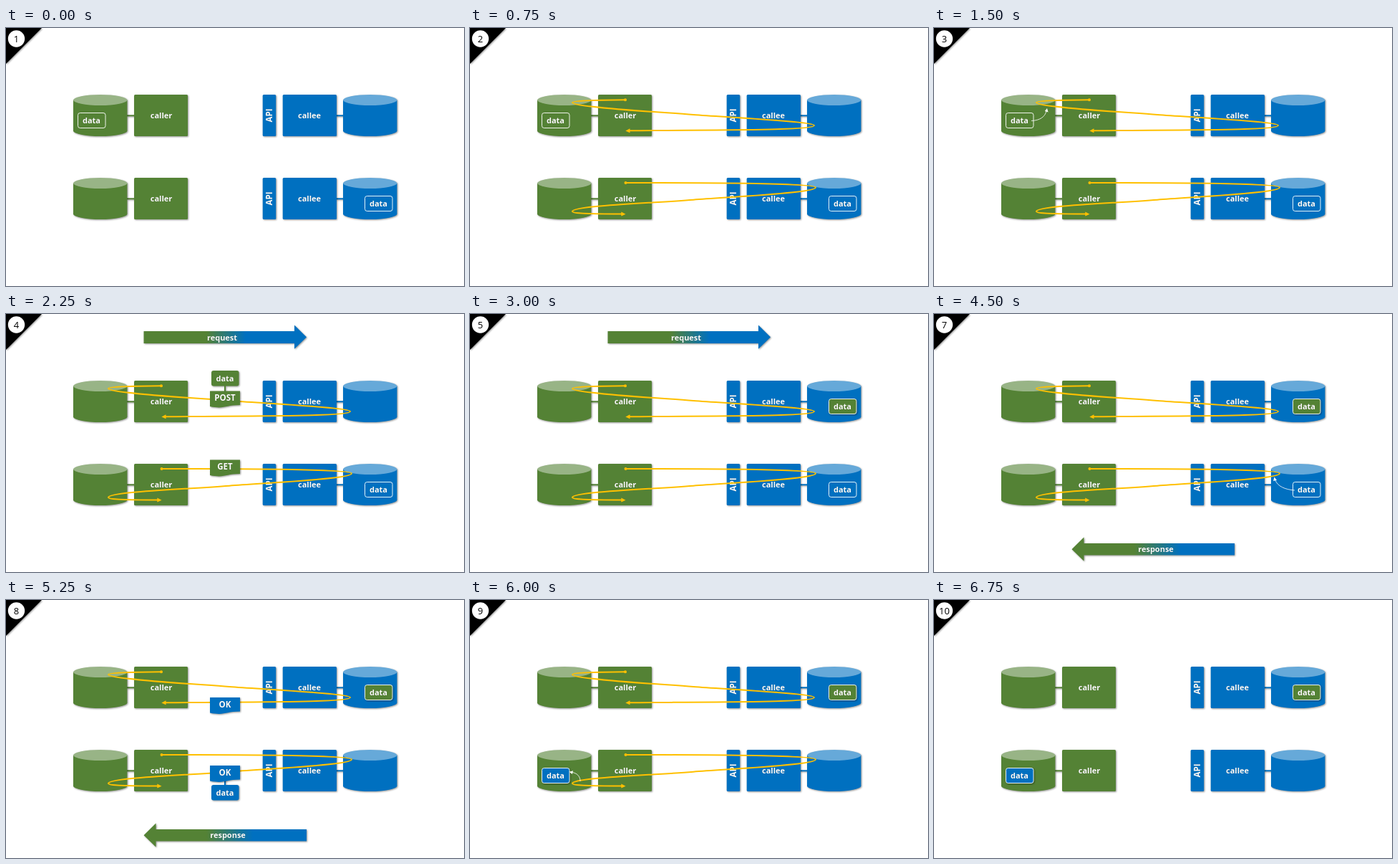
These frames come from a looping animation (640 by 360 pixels, 7500 ms). An HTML page:

```html
<!DOCTYPE html>
<html lang="en">
<head>
<meta charset="utf-8">
<title>Request and response</title>
<style>
  html, body { margin: 0; width: 100%; height: 100%; overflow: hidden; background: #fff; }
  svg { display: block; width: 100%; height: 100%; }
  text { font: 700 11px "Open Sans", "Noto Sans", sans-serif; fill: #fff; text-anchor: middle; }
  .caps { font-size: 11.5px; }
  .shadow { filter: drop-shadow(1px 1px 1px rgba(0, 0, 0, .42)); }
  .lettering { filter: drop-shadow(.6px .8px .5px rgba(0, 0, 0, .5)); }
  .flow { fill: none; stroke: #ffc000; stroke-width: 2; }
  .tip { fill: #ffc000; }
  .hint { fill: none; stroke: #fff; stroke-width: .8; }
  #number { font-weight: 400; font-size: 13px; fill: #000; }
</style>
</head>
<body>
<svg id="stage" viewBox="0 0 640 360" xmlns="http://www.w3.org/2000/svg">
  <defs>
    <linearGradient id="toBlue" gradientUnits="userSpaceOnUse" x1="280" x2="335">
      <stop stop-color="#548235"/><stop offset="1" stop-color="#0070c0"/>
    </linearGradient>
    <linearGradient id="fromBlue" gradientUnits="userSpaceOnUse" x1="280" x2="345">
      <stop stop-color="#548235"/><stop offset="1" stop-color="#0070c0"/>
    </linearGradient>
  </defs>
</svg>
<script>
const GREEN = '#548235', BLUE = '#0070c0';
const STEP_MS = 750;
const NUMBERS = [1, 2, 3, 4, 5, 5, 7, 8, 9, 10];
const stage = document.getElementById('stage');

const label = (x, y, text, cls = '') =>
  `<text class="lettering ${cls}" x="${x}" y="${y}">${text}</text>`;

const box = (x, y, w, h, fill, r = 1.5, extra = '') =>
  `<rect x="${x}" y="${y}" width="${w}" height="${h}" rx="${r}" fill="${fill}" ${extra}/>`;

const link = (d, color) => `<path d="${d}" stroke="${color}" stroke-width="2"/>`;

const cylinder = (x, y, fill, top) => `<g class="shadow">
  <path d="M${x} ${y + 7.5}v43a37.7 7.5 0 0 0 75.4 0v-43z" fill="${fill}"/>
  <ellipse cx="${x + 37.7}" cy="${y + 7.5}" rx="37.7" ry="7.5" fill="${top}"/></g>`;

const row = y => `
  <g class="shadow">${link(`M169 ${y + 29.3}h11`, GREEN)}${link(`M461 ${y + 29.3}h11`, BLUE)}</g>
  ${cylinder(94, y, GREEN, '#98b486')}
  ${cylinder(471, y, BLUE, '#66a9d9')}
  <g class="shadow">${box(179, y, 75, 58, GREEN)}${box(358.7, y, 18.5, 58, BLUE)}${box(386.7, y, 75.3, 58, BLUE)}</g>
  ${label(217, y + 33, 'caller')}${label(424, y + 33, 'callee')}
  <g transform="translate(372 ${y + 29}) rotate(-90)">${label(0, 0, 'API', 'caps')}</g>`;

const stored = (x, y, fill, raised) =>
  `<g class="${raised ? 'shadow' : ''}">${box(x + .5, y + .5, 38.5, 21, fill, 3, 'stroke="#fff" stroke-width=".9"')}</g>` +
  label(x + 19.5, y + 15, 'data');

const message = (y, text, fill) => `
  <path class="shadow" fill="${fill}" d="M285 ${y}h42v19.5c-21 0 -21 6 -42 2z"/>
  ${label(306, y + 13.5, text, 'caps')}`;

const carried = (y, linkY, fill) => `
  <g class="shadow">${link(`M306 ${linkY}v8`, fill)}${box(287, y, 38.5, 21.5, fill, 3)}</g>
  ${label(306, y + 15, 'data')}`;

const hint = (curve, head) =>
  `<path class="hint" d="${curve}"/><path fill="#fff" d="${head}"/>`;

// Shown from the first step through the last one, inclusive.
const during = (first, last, content) =>
  `<g data-first="${first}" data-last="${last}">${content}</g>`;

const flows = `
  <path class="flow" d="M217 100.3C185 100.6 143 101 143 104C143 110 245 116 312 121C375 125.500 481 131 481 136C481 143 350 142 222 143.300"/>
  <circle class="tip" cx="217" cy="100.3" r="2"/>
  <path class="tip" d="M217.300 143.400l6.200 -3.100v6z"/>
  <path class="flow" d="M217.500 216C350 215.500 483 217 483 222.500C483 230 375 235 312 239.700C245 245 143 248 143 256C143 259.500 180 259.300 213 259.600"/>
  <circle class="tip" cx="217.500" cy="216" r="2"/>
  <path class="tip" d="M217.500 259.700l-6.200 -3.100v6z"/>`;

stage.insertAdjacentHTML('beforeend', `
  <path class="shadow" d="M0 0H50L0 50z"/>
  <circle cx="14.5" cy="15" r="11.7" fill="#fff"/>
  <text id="number" x="14.5" y="19.600"></text>
  ${row(93)}${row(209)}
  ${during(0, 2, stored(100, 118, GREEN))}
  ${during(4, 9, stored(501, 118, GREEN, true))}
  ${during(0, 6, stored(501, 234, BLUE))}
  ${during(8, 9, stored(100, 234, BLUE, true))}
  ${during(1, 8, flows)}
  ${during(2, 2, hint('M136 129.500C148 129 155 124 157 116', 'M158 112l1.600 5.400l-4.800 -1.300z'))}
  ${during(5, 6, hint('M504 246C490 245 480 240 477 232', 'M475.500 227.500l3.500 4.300l-4.900 1.200z'))}
  ${during(8, 8, hint('M154 253C154 246 150 242 143 240.500', 'M138.700 239.700l5.300 -1.500l-1.200 4.900z'))}
  ${during(3, 4, `<path class="shadow" fill="url(#toBlue)" d="M192.500 24H403V15.500L420 32.200L403 48.800V41H192.500z"/>` +
    label(302, 36.5, 'request'))}
  ${during(3, 3, carried(79, 100, GREEN) + message(107.5, 'POST', GREEN) + message(203.5, 'GET', GREEN))}
  ${during(6, 7, `<path class="shadow" fill="url(#fromBlue)" d="M420 320H209.500V311.500L192.500 328.200L209.500 344.800V336.500H420z"/>` +
    label(310, 332, 'response'))}
  ${during(7, 7, carried(258, 251, BLUE) + message(136, 'OK', BLUE) + message(231, 'OK', BLUE))}
`);

const number = document.getElementById('number');
const timed = [...stage.querySelectorAll('[data-first]')];

function draw() {
  const step = Math.floor(performance.now() / STEP_MS) % NUMBERS.length;
  number.textContent = NUMBERS[step];
  for (const part of timed) {
    const shown = step >= +part.dataset.first && step <= +part.dataset.last;
    part.style.display = shown ? '' : 'none';
  }
  requestAnimationFrame(draw);
}
draw();
</script>
</body>
</html>
```
